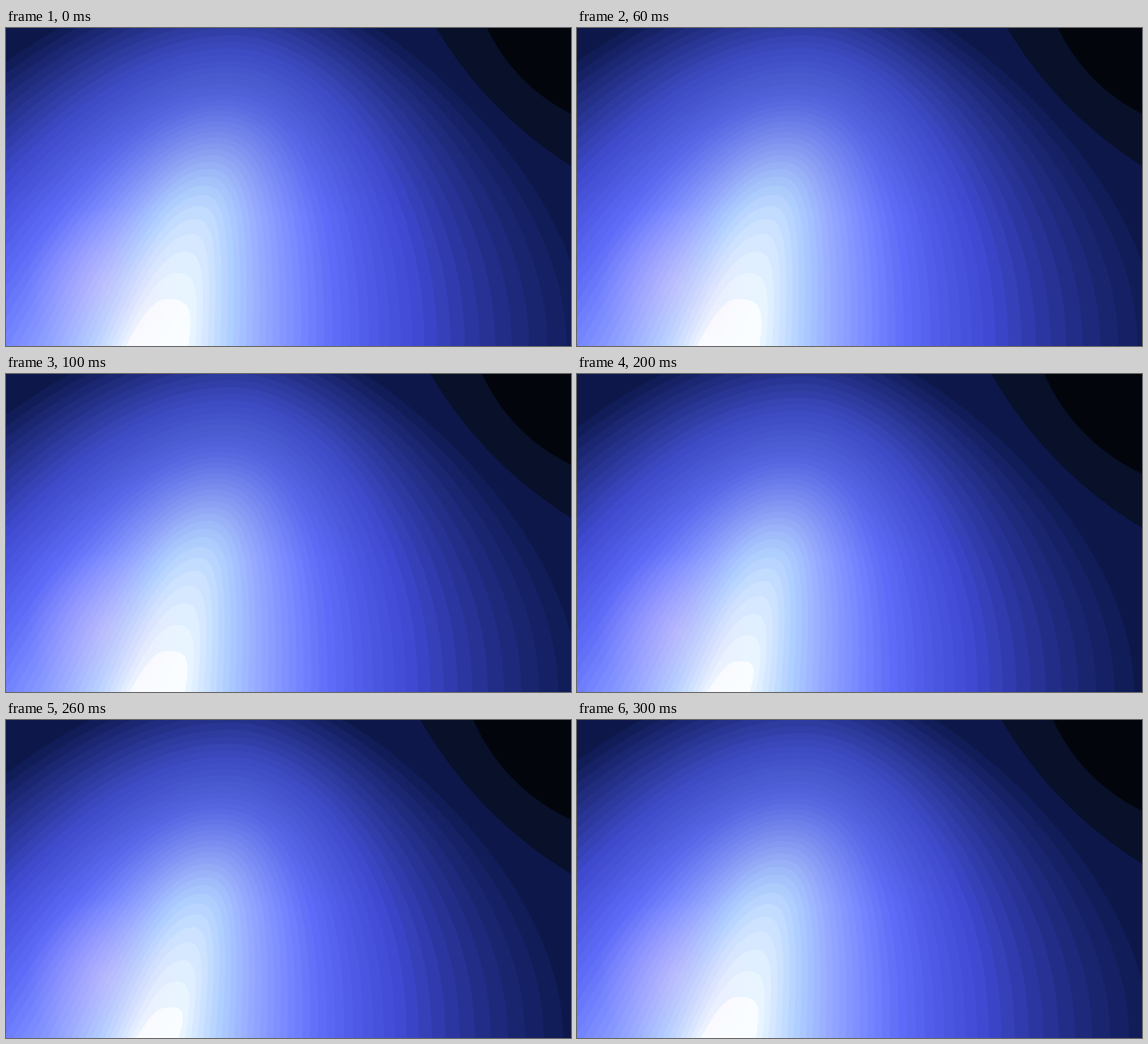
Write an HTML page with a canvas that moves like this. It is 998 px wide and 561 px high and loops after 0.4 s.

```html
<!DOCTYPE html>
<html lang="en">
<head>
<meta charset="utf-8">
<title>Pulsing glow</title>
<style>
  html, body { margin: 0; width: 100%; height: 100%; overflow: hidden; background: #0d174a; }
  canvas { display: block; width: 100%; height: 100%; }
</style>
</head>
<body>
<canvas id="stage" width="998" height="561"></canvas>
<script>
const W = 998, H = 561, LEVELS = 40;
const ctx = document.getElementById('stage').getContext('2d');

// Colour ramp from the core (level 0) outwards.
const ramp = [
  [0, '249,253,255'], [1, '232,245,255'], [7, '175,207,255'], [12, '150,169,255'],
  [17, '122,138,255'], [22, '93,107,248'], [30, '63,73,210'], [36, '34,45,136'], [40, '17,29,88']
].map(([level, rgb]) => ({ level, rgb: rgb.split(',').map(Number) }));

const mix = (a, b, t) => a.map((v, i) => v + (b[i] - v) * t);
const css = rgb => `rgb(${rgb.map(Math.round)})`;

function shade(level) {
  const i = Math.max(1, ramp.findIndex(stop => stop.level >= level));
  const a = ramp[i - 1], b = ramp[i];
  return mix(a.rgb, b.rgb, (level - a.level) / (b.level - a.level));
}

// Each band is slightly muted towards the top of the stage.
function bandFill(level) {
  const rgb = shade(level);
  const muted = mix(rgb, [60, 85, 150], 0.32 * Math.sin(Math.PI * level / LEVELS));
  const fill = ctx.createLinearGradient(0, 100, 0, 330);
  fill.addColorStop(0, css(muted));
  fill.addColorStop(1, css(rgb));
  return fill;
}

// Pulls a point towards the glow's base.
function contract(x, y, pulse) {
  const dx = x - 270, dy = y - H, r = Math.hypot(dx, dy);
  return [x - dx / r * (15 + 0.035 * r) * pulse, y - dy / r * 30 * pulse];
}

function drawArch(level, pulse) {
  const left = 212 - 8 * level - 0.25 * level ** 2;
  const right = 322 + 11.2 * level + 0.0001 * level ** 4;
  const topX = 345 + 1.7 * level - 62 * Math.exp(-level / 3);
  const topY = 300 - 8 * level + 178 * Math.exp(-level / 4.2) - 0.00003 * level ** 4;
  const height = H - topY, spread = level / 38;
  const at = (x, y) => contract(x, y, pulse);

  ctx.beginPath();
  ctx.moveTo(...at(left, H));
  ctx.bezierCurveTo(
    ...at(left + 0.3 * (topX - left), H - 0.5 * height),
    ...at(topX - 0.35 * (topX - left), topY),
    ...at(topX, topY));
  ctx.bezierCurveTo(
    ...at(topX + (1 - 0.65 * spread) * (right - topX), topY),
    ...at(right + 10 * (1 - spread), H - (0.85 - 0.35 * spread) * height),
    ...at(right, H));
  ctx.fillStyle = bandFill(level);
  ctx.fill();
}

function disc(x, y, radius, color) {
  ctx.beginPath();
  ctx.arc(x, y, radius, 0, 2 * Math.PI);
  ctx.fillStyle = color;
  ctx.fill();
}

function draw(pulse) {
  ctx.fillStyle = '#0d174a';
  ctx.fillRect(0, 0, W, H);
  for (let level = LEVELS; level >= 0; level--) drawArch(level, pulse);

  // Lavender flank on the left.
  const flank = ctx.createRadialGradient(175, 455, 0, 175, 455, 140);
  flank.addColorStop(0, 'rgba(255,200,248,0.28)');
  flank.addColorStop(1, 'rgba(255,200,248,0)');
  disc(175, 455, 140, flank);

  // Dark corner, growing as the glow shrinks.
  disc(1389, -378, 734 + 24 * pulse, '#08102a');
  disc(1139, -135, 319 + 22 * pulse, '#02050c');
}

const pulses = [0, 0.36, 1, 0.36];
let shown = -1;
function tick() {
  const step = Math.floor(performance.now() / 100) % pulses.length;
  if (step !== shown) draw(pulses[shown = step]);
  requestAnimationFrame(tick);
}
tick();
</script>
</body>
</html>
```
